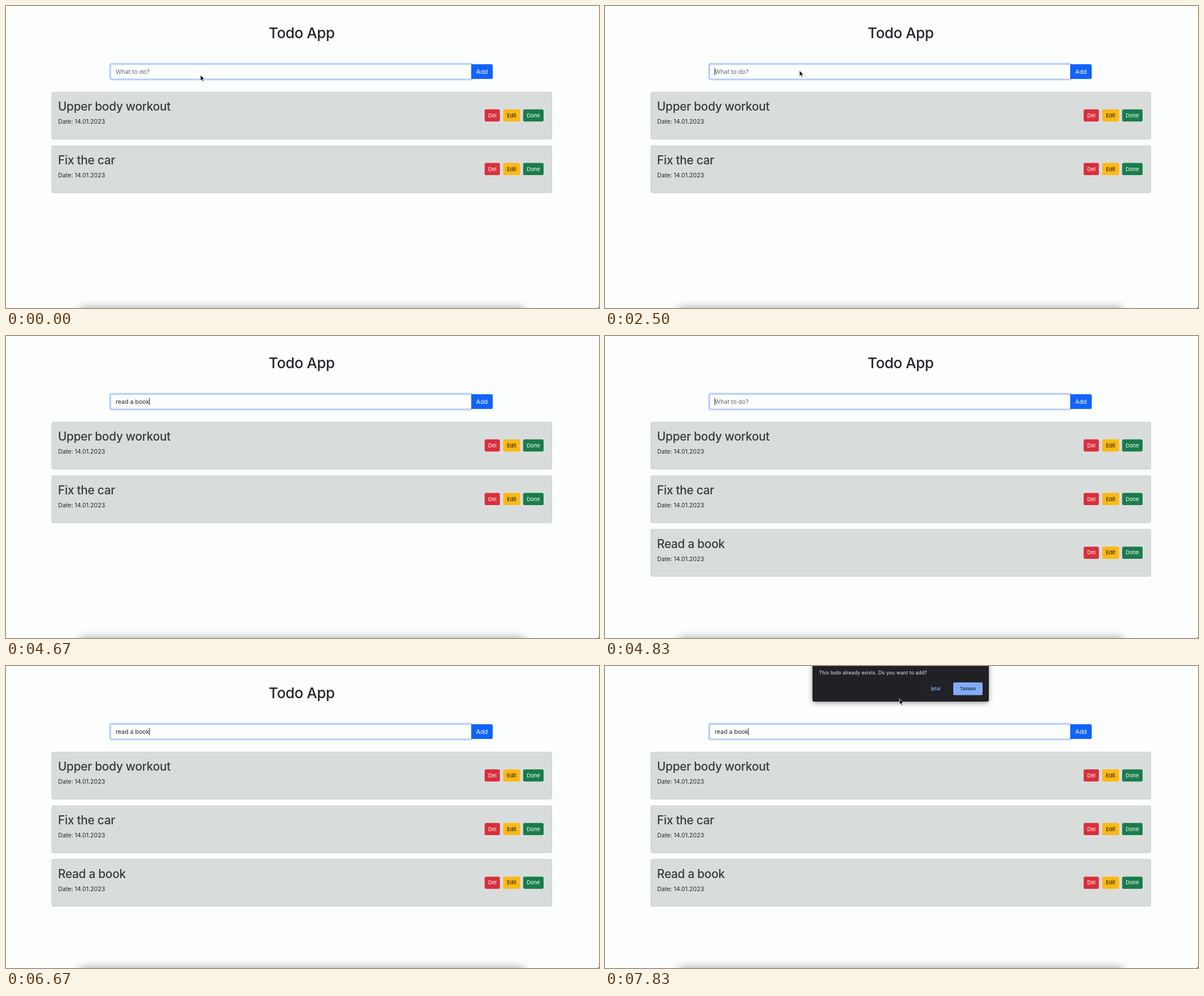
An HTML page for the animation above (8 s loop, 1049 by 534 pixels).

```html
<!DOCTYPE html>
<html lang="en">
<head>
<meta charset="utf-8">
<title>Todo App</title>
<style>
  html, body { margin: 0; width: 100%; height: 100%; overflow: hidden; background: #fcfefd; }
  svg { display: block; width: 100%; height: 100%; }
  text { font: 10.6px Inter, Roboto, sans-serif; fill: #24282a; white-space: pre; }
  .title { font-size: 26px; font-weight: 500; letter-spacing: -.015em; fill: #212529; }
  .task { font-size: 20.8px; font-weight: 500; letter-spacing: -.013em; fill: #363b3e; }
  .small { font-size: 9.4px; }
  .question { font-size: 8.7px; letter-spacing: .012em; fill: #e8eaed; }
  .choice { font-size: 8px; font-weight: 600; }
  .middle { text-anchor: middle; }
</style>
</head>
<body>
<svg viewBox="0 0 1049 534">
  <defs>
    <filter id="blur" x="-20%" y="-100%" width="140%" height="300%"><feGaussianBlur stdDeviation="8"/></filter>
    <filter id="soft" x="-20%" y="-50%" width="140%" height="200%"><feGaussianBlur stdDeviation="5"/></filter>
  </defs>
  <rect width="1049" height="534" fill="#fcfefd"/>
  <text class="title middle" x="523" y="57">Todo App</text>

  <rect x="182.5" y="100.5" width="643.5" height="31" rx="4.5" fill="#bfd5fc"/>
  <rect x="185.2" y="103.2" width="638.8" height="25.8" rx="2.2" fill="#fdfefe" stroke="#90b8fa" stroke-width=".8"/>
  <path d="M823 103h35.5a2.5 2.5 0 0 1 2.5 2.5v21a2.5 2.5 0 0 1-2.5 2.5H823z" fill="#1163fb"/>
  <text class="middle" x="842" y="120" style="fill:#fff">Add</text>
  <text id="entry" x="194" y="120"></text>
  <rect id="caret" y="109.5" width="1" height="13" fill="#202224"/>

  <g id="cards"></g>

  <rect x="130" y="534" width="787" height="50" rx="6" opacity=".38" filter="url(#blur)"/>
  <rect x="1047.5" y="532.5" width="1.5" height="1.5" fill="#555"/>

  <g id="dialog">
    <rect x="367" y="-30" width="312" height="95" rx="4" opacity=".4" filter="url(#soft)"/>
    <rect x="367" y="-30" width="312" height="93" rx="3.5" fill="#202124"/>
    <text class="question" x="378.5" y="15">This todo already exists. Do you want to add?</text>
    <rect x="559" y="29.5" width="51.5" height="21.5" rx="2.5" fill="none" stroke="#2d2f33" stroke-width=".8"/>
    <text class="choice middle" x="584.7" y="43" style="fill:#80aaf5">İptal</text>
    <rect x="616" y="29" width="52" height="22.5" rx="2.5" fill="#83abf8"/>
    <text class="choice middle" x="642" y="43" style="fill:#202f4c">Tamam</text>
  </g>

  <path id="pointer" d="M0 0V10.2L2.4 8L4 11.7L5.7 11L4.1 7.4H7.3Z" fill="#0b0b0b" stroke="#fff" stroke-width=".8" stroke-linejoin="round"/>
</svg>
<script>
const LOOP = 8000, STEPS_PER_SECOND = 6;
const PHRASE = "read a book";
const FIRST_TYPING = 17, ADDED = 29, DIALOG = 42, LAST = 47;
const [entry, caret, cards, dialog, pointer] =
  ["entry", "caret", "cards", "dialog", "pointer"].map(id => document.getElementById(id));

const button = (x, width, label, fill, color) => `
  <rect x="${x}" y="31" width="${width}" height="21.5" rx="2.7" fill="${fill}"/>
  <text class="small middle" x="${x + width / 2}" y="45" style="fill:${color}">${label}</text>`;

const card = (name, i) => `<g transform="translate(0 ${151.8 + 94.8 * i})">
  <rect x="81" y=".4" width="884.5" height="83.2" rx="2.6" fill="#d8dddc" stroke="#c3c8c7" stroke-width=".8"/>
  <text class="task" x="92" y="33.2">${name}</text>
  <text x="92.3" y="56.3">Date: 14.01.2023</text>
  ${button(846.7, 27, "Del", "#d8303e", "#fff")}
  ${button(879.5, 30, "Edit", "#fdb814", "#111")}
  ${button(914.8, 36.2, "Done", "#1a7d4b", "#fff")}
</g>`;

cards.innerHTML = ["Upper body workout", "Fix the car", "Read a book"].map(card).join("");

const show = (node, visible) => node.setAttribute("visibility", visible ? "visible" : "hidden");

function pointerPosition(step) {
  if (step < 1) return [344, 122];
  if (step < DIALOG) return [344, 114];
  const p = Math.min(1, (step - DIALOG) / (LAST - DIALOG));
  const eased = p * p * (3 - 2 * p);
  return [343.5 + 177.5 * eased, 114 - 56 * eased];
}

function draw(time) {
  const step = Math.floor((time + 4) * STEPS_PER_SECOND / 1000);
  const typed = PHRASE.slice(0, Math.max(0, step - (step < ADDED ? FIRST_TYPING : ADDED)));
  entry.textContent = typed || "What to do?";
  entry.style.fill = typed ? "#202427" : "#62686c";
  caret.setAttribute("x", 193.8 + (typed ? entry.getComputedTextLength() : 0));
  show(caret, step >= 15);
  show(cards.lastElementChild, step >= ADDED);
  show(dialog, step >= DIALOG);
  show(pointer, step <= FIRST_TYPING || step >= DIALOG);
  pointer.setAttribute("transform", `translate(${pointerPosition(step)})`);
}

const start = performance.now();
function tick() {
  draw((performance.now() - start) % LOOP);
  requestAnimationFrame(tick);
}
tick();
</script>
</body>
</html>
```
